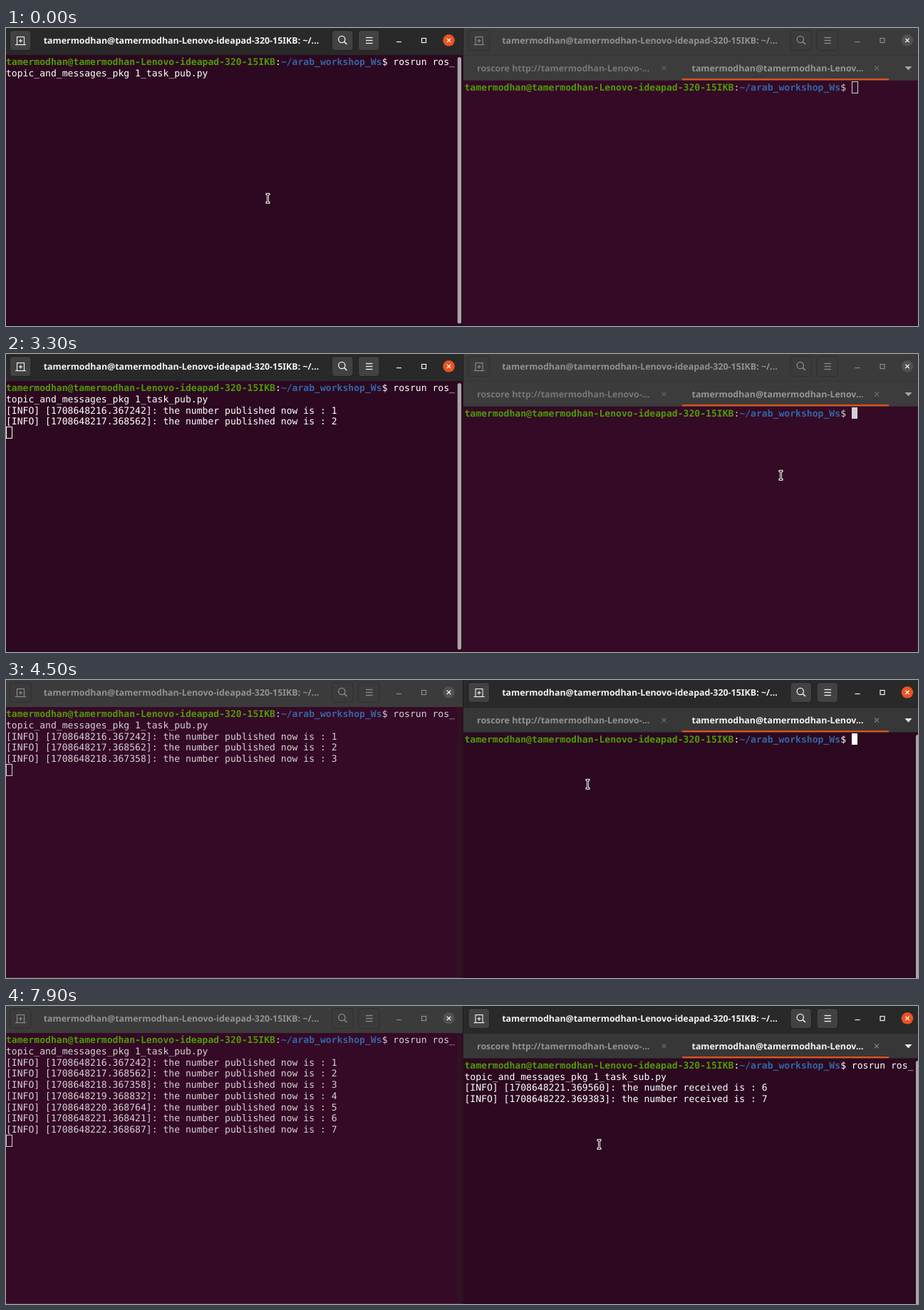
Write an HTML page with a canvas that moves like this. It is 1280 by 419 pixels and loops after 8 s.

```html
<!DOCTYPE html>
<html lang="en">
<head>
<meta charset="utf-8">
<title>Publisher and subscriber terminals</title>
<style>
  html, body { margin: 0; width: 100%; height: 100%; overflow: hidden; background: #2c0920; }
  canvas { display: block; }
</style>
</head>
<body>
<canvas id="stage" width="1280" height="419"></canvas>
<script>
const ctx = document.getElementById('stage').getContext('2d');
const LOOP = 8000;
const COLS = 80, CELL_W = 7.875, CELL_H = 15.75;
const BLINK = 600;
const MONO = '13.08px "DejaVu Sans Mono", monospace';
const SANS = 'bold 12.4px "Noto Sans", "Open Sans", sans-serif';
const GREEN = '#4e9a06', BLUE = '#3465a4', ORANGE = '#e95420';

const USER = 'tamermodhan';
const HOST = USER + '@' + USER + '-Lenovo-ideapad-320-15IKB';
const CWD = '~/arab_workshop_Ws';
const PROMPT_COLS = HOST.length + CWD.length + 3;
const ROOM = COLS - PROMPT_COLS;
const TITLE = HOST + ': ~/...';

const command = script => 'rosrun ros_topic_and_messages_pkg ' + script + ' ';
const left = {
  x: 0, top: 39.4, command: command('1_task_pub.py'), verb: 'published now', first: 1,
  micros: [367242, 368562, 367358, 368832, 368764, 368421, 368687]
};
const right = {
  x: 643.5, top: 75.2, command: command('1_task_sub.py'), verb: 'received', first: 6,
  micros: [369560, 369383]
};

// Key moments
const ENTER_LEFT = 1500, FOCUS = 3400, TYPE = 5000, PASTE = 5500, ENTER_RIGHT = 6500;
const STALL_END = 7000;

// Pointer glides: start, end, x, y
const GLIDES = [
  [2300, 2400, 368, 296], [2500, 2900, 1224, 50], [3000, 3300, 1087, 170],
  [3400, 3900, 664, 14], [3900, 4100, 803, 124], [4400, 4500, 816, 146],
  [7800, 7900, 832, 194]
];

const clamp = v => Math.min(1, Math.max(0, v));
const ease = v => v * v * (3 - 2 * v);
const blink = (t, since) => Math.floor((t - since) / BLINK) % 2 === 0;

// Grey between its unfocused and focused level
function grey(off, on, focus) {
  const v = Math.round(off + (on - off) * focus);
  return `rgb(${v},${v},${v})`;
}

function rect(x, y, w, h, color) {
  ctx.fillStyle = color;
  ctx.fillRect(x, y, w, h);
}

function rounded(x, y, w, h, r, fill, stroke) {
  ctx.beginPath();
  ctx.roundRect(x, y, w, h, r);
  ctx.fillStyle = fill;
  ctx.fill();
  if (stroke) {
    ctx.lineWidth = 1;
    ctx.strokeStyle = stroke;
    ctx.stroke();
  }
}

function box(x, y, w, h, color, width = 1) {
  ctx.strokeStyle = color;
  ctx.lineWidth = width;
  ctx.strokeRect(x, y, w, h);
}

function line(x1, y1, x2, y2, color, width = 1) {
  ctx.beginPath();
  ctx.moveTo(x1, y1);
  ctx.lineTo(x2, y2);
  ctx.strokeStyle = color;
  ctx.lineWidth = width;
  ctx.stroke();
}

function cross(x, y, r, color, width) {
  line(x - r, y - r, x + r, y + r, color, width);
  line(x - r, y + r, x + r, y - r, color, width);
}

function circle(x, y, r) {
  ctx.beginPath();
  ctx.arc(x, y, r, 0, Math.PI * 2);
}

function text(str, x, y, color, font) {
  ctx.font = font;
  ctx.fillStyle = color;
  ctx.fillText(str, x, y);
}

function drawHeader(x, focus) {
  const icon = grey(140, 242, focus);
  rect(x, 0, 642, 38, grey(59, 41, focus));
  for (const bx of [5.5, 457.5, 494.5]) {
    rounded(x + bx, 3.5, 29.5, 28, 4, grey(59, 66, focus), grey(46, 33, focus));
  }

  // New tab
  box(x + 15.5, 12.5, 10, 11, icon, 1.1);
  line(x + 13, 23.5, x + 28, 23.5, icon, 1.1);
  line(x + 20.5, 15.5, x + 20.5, 20.5, icon, 1.2);
  line(x + 18, 18, x + 23, 18, icon, 1.2);

  // Search
  circle(x + 471.3, 16, 4.6);
  ctx.strokeStyle = icon;
  ctx.lineWidth = 1.3;
  ctx.stroke();
  line(x + 474.7, 19.4, x + 478.5, 23, icon, 1.6);

  // Menu
  for (const y of [13.5, 17.5, 21.5]) line(x + 505, y, x + 514.5, y, icon, 1.3);

  // Window controls
  line(x + 548, 19.5, x + 555, 19.5, icon, 1.2);
  box(x + 583.5, 14.5, 6, 6, icon, 1.2);
  circle(x + 621.5, 17.3, 8.3);
  ctx.fillStyle = focus > 0.3 ? ORANGE : '#515151';
  ctx.fill();
  cross(x + 621.5, 17.3, 2.7, '#f4f4f4', 1.3);

  text(TITLE, x + 52.7, 22, grey(145, 243, focus), SANS);
}

function drawTabs(focus) {
  rect(642, 38, 638, 36, grey(60, 55, focus));
  rect(642, 38, 638, 1, grey(52, 38, focus));
  rect(642, 73, 638, 1, grey(50, 38, focus));
  text('roscore http://' + USER + '-Lenovo-...', 661, 60.5, grey(118, 146, focus), SANS);
  text(USER + '@' + USER + '-Lenov...', 962.5, 60.5, grey(149, 243, focus), SANS);
  cross(923.5, 56.5, 3, grey(92, 105, focus), 1.2);
  cross(1222, 56.5, 3, grey(105, 125, focus), 1.2);
  rect(949, 71, 290, 2.4, '#d9521f');
  ctx.beginPath();
  ctx.moveTo(1261.5, 54);
  ctx.lineTo(1271.5, 54);
  ctx.lineTo(1266.5, 59.5);
  ctx.fillStyle = grey(165, 243, focus);
  ctx.fill();
}

function drawLine(win, row, col, str, color, bold) {
  text(str, win.x + col * CELL_W, win.top + row * CELL_H + 12.75, color,
       (bold ? 'bold ' : '') + MONO);
}

// One message a second; the screen stalls while the subscriber starts
function lastMessage(t) {
  const seen = t >= ENTER_RIGHT && t < STALL_END ? ENTER_RIGHT : t;
  return Math.floor((seen - 600) / 1000);
}

function drawTerminal(win, t, typed, ink) {
  drawLine(win, 0, 0, HOST, GREEN, true);
  drawLine(win, 0, HOST.length, ':', ink);
  drawLine(win, 0, HOST.length + 1, CWD, BLUE, true);
  drawLine(win, 0, PROMPT_COLS - 2, '$ ' + typed.slice(0, ROOM), ink);
  drawLine(win, 1, 0, typed.slice(ROOM), ink);
  for (let n = win.first; n <= lastMessage(t); n++) {
    const i = n - win.first;
    const stamp = 1708648215 + n + '.' + win.micros[i];
    drawLine(win, i + 2, 0, `[INFO] [${stamp}]: the number ${win.verb} is : ${n}`, ink);
  }
}

// The cursor follows the typed text, or the log once the command runs
function drawCursor(win, t, typed, running, solid, ink) {
  const wrapped = typed.length > ROOM;
  let row = wrapped ? 1 : 0;
  let col = wrapped ? typed.length - ROOM : PROMPT_COLS + typed.length;
  if (running) {
    row = 2 + Math.max(0, lastMessage(t) - win.first + 1);
    col = 0;
  }
  const x = Math.round(win.x + col * CELL_W), y = Math.round(win.top + row * CELL_H);
  if (solid) rect(x, y, 8, 16, ink);
  else box(x + 0.5, y + 0.5, 8, 16, ink);
}

function drawArrow(x, y) {
  ctx.beginPath();
  [[0, 0], [0, 13], [3, 10.5], [5, 15], [7, 14], [5, 9.8], [9, 9.5]]
    .forEach(([dx, dy]) => ctx.lineTo(x + dx, y + dy));
  ctx.closePath();
  ctx.fillStyle = '#111';
  ctx.fill();
  ctx.strokeStyle = '#fff';
  ctx.lineWidth = 1;
  ctx.stroke();
}

function drawBeam(x, y) {
  const cx = x + 0.5;
  for (const [color, width, half] of [['#f4f4f4', 3, 3], ['#1c1018', 1, 2]]) {
    line(cx, y - 6, cx, y + 7, color, width);
    for (const ey of [y - 5.5, y + 6.5]) line(cx - half, ey, cx + half, ey, color, width);
  }
}

function drawPointer(t) {
  const typing = (t >= 1100 && t < 2300) || (t >= 4800 && t < 7900);
  if (typing) return;
  const now = Math.floor(t / 100) * 100;
  let x = 367, y = 239;
  for (const [start, end, toX, toY] of GLIDES) {
    const k = ease(clamp((now - start) / (end - start)));
    x += (toX - x) * k;
    y += (toY - y) * k;
  }
  (y < 75 ? drawArrow : drawBeam)(Math.round(x), Math.round(y));
}

function draw(t) {
  const leftActive = t < FOCUS;
  const leftFocus = leftActive ? 1 : clamp((3600 - t) / 320);
  const rightFocus = leftActive ? 0 : 1;
  const body = active => active ? '#2c0920' : '#350a26';
  const ink = active => active ? '#ffffff' : '#d5d0d3';
  const leftInk = ink(leftActive), rightInk = ink(!leftActive);

  rect(0, 38, 642, 381, body(leftActive));
  rect(642, 74, 638, 345, body(!leftActive));
  drawHeader(0, leftFocus);
  drawHeader(643.5, rightFocus);
  rect(642, 0, 2, 38, grey(59, 41, rightFocus));
  drawTabs(rightFocus);

  // Scrollbars, seam between the windows and lower edge
  if (leftActive) {
    rounded(633.7, 41, 5.3, 374.5, 2.6, '#aaa5a8');
    rect(1277, 75, 3, 344, '#301222');
  } else {
    rect(633.5, 39, 5.5, 377, '#301222');
    rounded(1277, 77, 6, 350, 2.6, '#aaa5a8');
    rect(0, 418, 642, 1, '#3d2a38');
  }
  rect(641, 0, 1, 419, '#241720');

  const typed = t < TYPE ? '' : t < PASTE ? 'rosru' : right.command;
  drawTerminal(left, t, left.command, leftInk);
  drawTerminal(right, t, typed, rightInk);

  // Unfocused cursors are steady outlines; keystrokes restart the blink
  const leftSolid = t < 3200;
  const leftSince = t < 1400 ? -200 - BLINK : 1400;
  if (!leftSolid || blink(t, leftSince)) {
    drawCursor(left, t, left.command, t >= ENTER_LEFT, leftSolid, leftInk);
  }
  const rightSolid = t >= 3300;
  const rightSince = t < TYPE ? 3300 : Math.min(t, 6000);
  if (!rightSolid || blink(t, rightSince)) {
    drawCursor(right, t, typed, t >= ENTER_RIGHT, rightSolid, rightInk);
  }
  drawPointer(t);
}

ctx.textRendering = 'geometricPrecision';
function tick() {
  draw(performance.now() % LOOP);
  requestAnimationFrame(tick);
}
tick();
</script>
</body>
</html>
```
